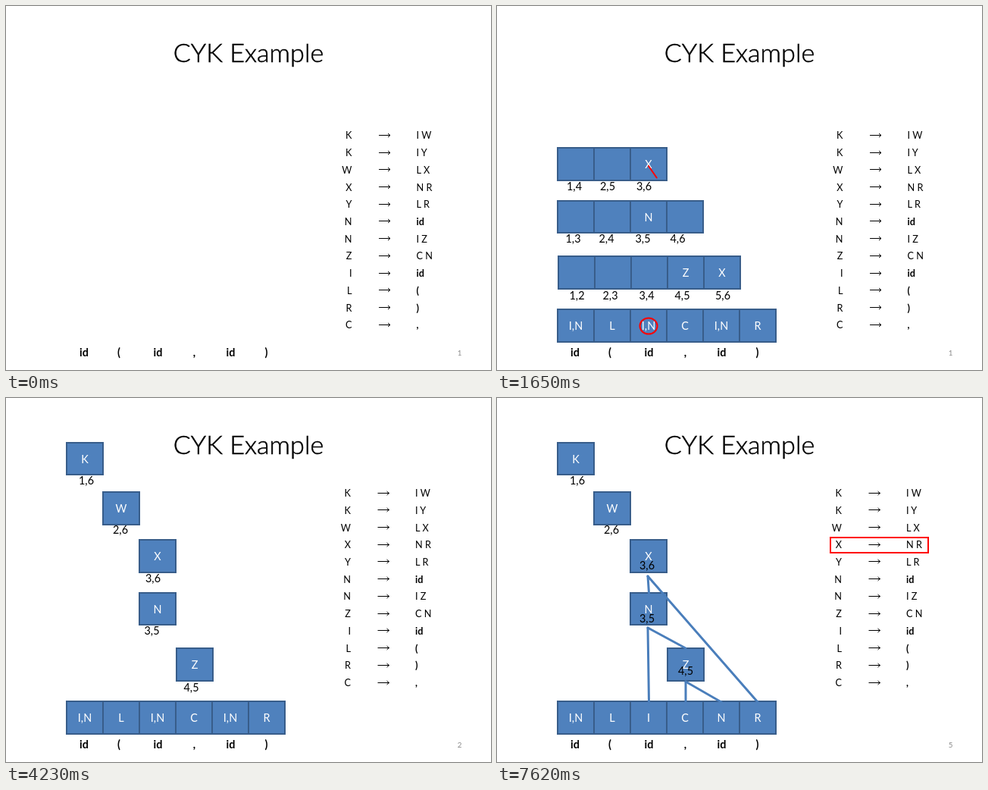
An HTML page for the animation above (8000 ms loop, 640 by 480 pixels).

```html
<!DOCTYPE html>
<html lang="en">
<head>
<meta charset="utf-8">
<title>CYK Example</title>
<style>
  html, body { margin: 0; width: 100%; height: 100%; overflow: hidden; background: #fff; }
  svg { display: block; width: 640px; height: 480px; font-family: Lato, Carlito, sans-serif; }
  .title { stroke: #000; stroke-width: .5; }
</style>
</head>
<body>
<svg id="stage" viewBox="0 0 640 480"></svg>
<script>
const LOOP = 8000;
const STEP = 60;
const RED = '#f00';
const stage = document.getElementById('stage');

const rules = ['K>I W', 'K>I Y', 'W>L X', 'X>N R', 'Y>L R', 'N>id', 'N>I Z',
               'Z>C N', 'I>id', 'L>(', 'R>)', 'C>,'].map(rule => rule.split('>'));

// Chart rows from the bottom up; row n holds spans of n + 1 tokens.
const rows = [
  { x: 80, y: 400, h: 43, marks: ['I,N', 'L', 'I,N', 'C', 'I,N', 'R'] },
  { x: 81, y: 330, h: 43, marks: ['', '', '', 'Z', 'X'], labelY: 382, labels: [105.5, 149.5, 197.5, 244.5, 298] },
  { x: 80, y: 257, h: 42, marks: ['', '', 'N', ''], labelY: 307, labels: [100.5, 144.5, 192.5, 238.5] },
  { x: 80, y: 187, h: 43, marks: ['', '', 'X'], labelY: 238, labels: [102, 146, 194] },
  { x: 80, y: 124, h: 43, marks: ['', 'W'], labelY: 174, labels: [103, 151] },
  { x: 80, y: 59, h: 42, marks: ['K'], labelY: 109, labels: [106] }
];

// Text is centred vertically on y, with its baseline on a whole pixel.
function text(str, x, y, { size = 14.4, anchor = 'middle', weight = 400, fill = '#000', kind = '' } = {}) {
  const base = Math.round(y + size * 0.36);
  return `<text class="${kind}" x="${x}" y="${base}" font-size="${size}" font-weight="${weight}" text-anchor="${anchor}" fill="${fill}">${str}</text>`;
}

function line(x1, y1, x2, y2, color, width) {
  return `<path d="M${x1} ${y1}L${x2} ${y2}" stroke="${color}" stroke-width="${width}" stroke-linecap="round"/>`;
}

const link = (...ends) => line(...ends, '#4a7ebb', 3);

const ring = (x, y) =>
  `<ellipse cx="${x}" cy="${y}" rx="11.5" ry="10.5" fill="none" stroke="${RED}" stroke-width="2"/>`;

function cell(row, col, mark = rows[row].marks[col]) {
  const { x, y, h } = rows[row];
  const left = x + 48 * col;
  return `<rect x="${left}" y="${y}" width="48" height="${h}" fill="#4f81bd" stroke="#385d8a" stroke-width="2"/>` +
    text(mark, left + 24, y + 21.6, { fill: '#fff' });
}

function label(row, col, x, y) {
  const { labels, labelY } = rows[row];
  return labels ? text(`${col + 1},${col + row + 1}`, x ?? labels[col], y ?? labelY) : '';
}

const ruleY = (index, top) => top + 22.73 * index;

function ruleList(x, top) {
  return rules.map(([head, body], i) => {
    const y = ruleY(i, top);
    const weight = /[A-Z]/.test(body) ? 400 : 700;
    return text(head, x + 456.5, y, { size: 12.7, anchor: 'end' }) +
      `<path d="M${x + 492} ${Math.round(y) - .5}h15m-3 -2.5l3 2.5l-3 2.5" fill="none" stroke="#000"/>` +
      text(body, x + 541.5, y, { size: 12.7, anchor: 'start', weight });
  }).join('');
}

const ruleBox = (index, top) =>
  `<rect x="440" y="${Math.round(ruleY(index, top) - 9.6)}" width="129" height="20" fill="none" stroke="${RED}" stroke-width="2"/>`;

function frame(number) {
  const tokens = ['id', '(', 'id', ',', 'id', ')'];
  const places = [103, 149, 200.5, 248.5, 296.5, 343.5];
  return text('CYK Example', 320, 61.5, { size: 34.2, weight: 300, kind: 'title' }) +
    tokens.map((token, i) => text(token, places[i], 457, { weight: 700 })).join('') +
    text(number, 598.7, 457.3, { size: 9.8, fill: '#898989' });
}

// Cells appear one per step, with a pause after the tenth.
function cellCount(t) {
  if (t >= 4170) return 21;
  if (t < 800) return Math.min(10, Math.floor(t / STEP));
  return Math.min(18, 11 + Math.floor((t - 800) / STEP));
}

function wipe(t, start, x1, y1, x2, y2) {
  const p = Math.min(1, (t - start) / 240);
  return p > 0 ? line(x1, y1, x1 + (x2 - x1) * p, y1 + (y2 - y1) * p, RED, 2) : '';
}

// Tries each split of span 3,6: walk up the column and down the diagonal.
function pointers(t) {
  let out = '';
  const during = (from, to, draw) => { if (t >= from && t < to) out += draw(); };
  during(1410, 2250, () => ring(200, 422));
  during(1650, 2130, () => wipe(t, 1590, 200, 211, 243, 273));
  during(1890, 2250, () => ring(248, 278));
  during(2310, 3030, () => ring(202, 351));
  during(2370, 3030, () => ring(296, 352));
  during(3090, 4170, () => ring(199, 278));
  during(3210, 4170, () => wipe(t, 3150, 298, 359, 337, 416));
  during(3450, 4170, () => ring(344, 422.5));
  during(3630, 4170, () => ruleBox(3, 170.8));
  during(3870, 4170, () => ring(200, 208.5));
  return out;
}

function buildScene(t) {
  let left = cellCount(t);
  let out = frame(1) + ruleList(0, 170.8);
  rows.forEach((row, r) => row.marks.forEach((_, c) => {
    if (left-- > 0) out += cell(r, c) + label(r, c);
  }));
  return out + pointers(t);
}

function treeScene(page) {
  const top = 125.5;
  const bottom = [...rows[0].marks];
  if (page > 2) bottom[4] = 'N';
  if (page > 3) bottom[2] = 'I';
  let out = frame(page) + ruleList(-1.5, top);
  out += bottom.map((mark, c) => cell(0, c, mark)).join('');
  out += [[1, 3], [2, 2], [3, 2], [4, 1], [5, 0]].map(([r, c]) => cell(r, c)).join('');
  if (page > 2) out += link(249, 374, 249, 400) + link(249, 374, 296, 401);
  if (page > 3) out += link(199, 303, 200.5, 401) + link(199, 303, 249, 330);
  if (page > 4) out += link(199, 235, 200.5, 257) + link(199, 235, 344, 401);
  out += page > 2 ? label(1, 3, 249, 360) : label(1, 3);
  out += page > 3 ? label(2, 2, 198, 291) : label(2, 2);
  out += page > 4 ? label(3, 2, 198, 221) : label(3, 2);
  out += label(4, 1) + label(5, 0);
  const used = { 3: 7, 4: 6, 5: 3 }[page];
  return used ? out + ruleBox(used, top) : out;
}

function scene(t) {
  if (t < 4230) return buildScene(Math.floor(t / 10) * 10);
  return treeScene(2 + Math.floor((t - 4230) / 1130));
}

let shown = '';
const start = performance.now();
function tick() {
  const next = scene((performance.now() - start) % LOOP);
  if (next !== shown) stage.innerHTML = shown = next;
  requestAnimationFrame(tick);
}
tick();
</script>
</body>
</html>
```
